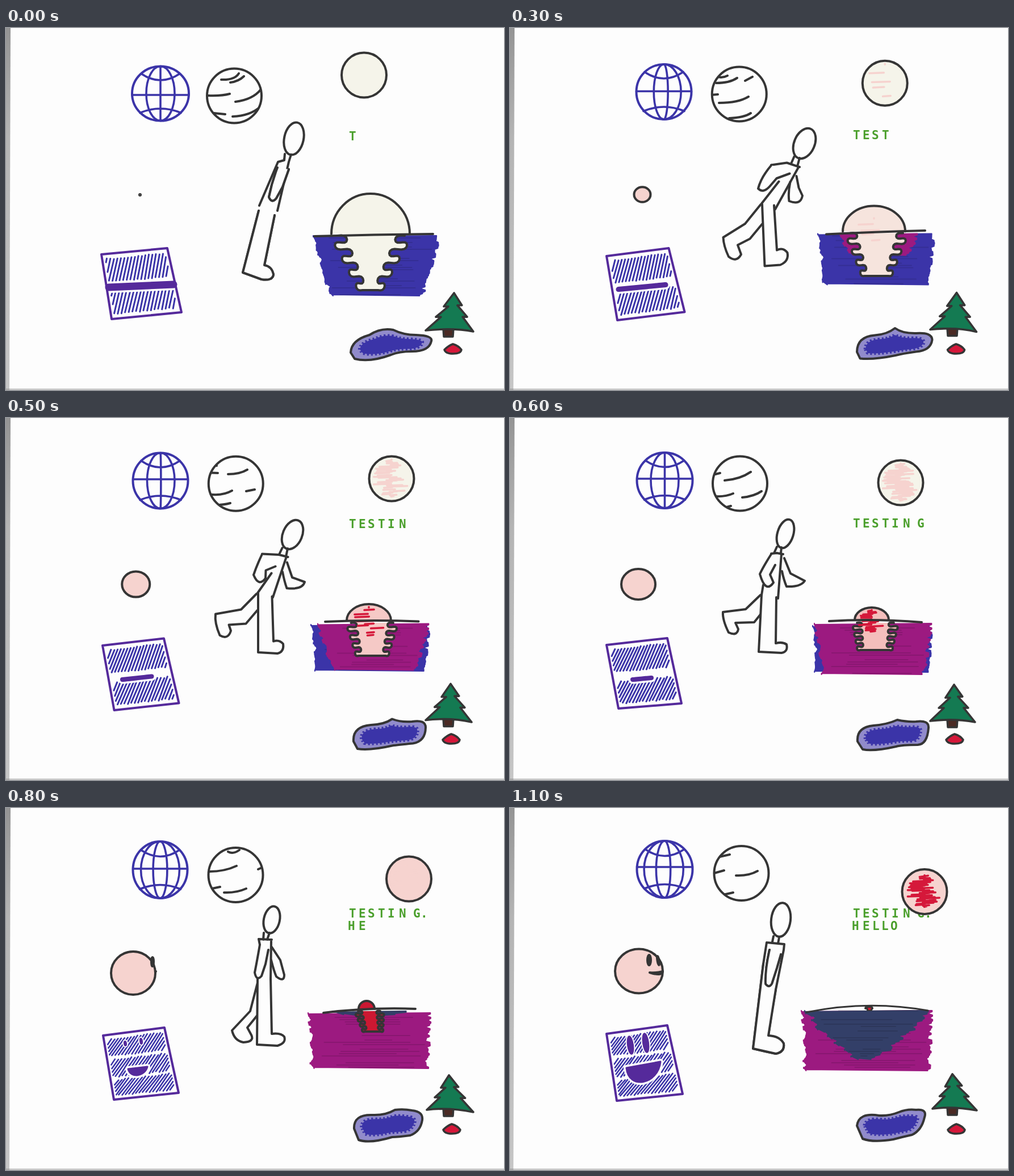
Recreate the animation shown at these times as an HTML page. Size 877 by 638 pixels, loop 1200 ms.

```html
<!DOCTYPE html>
<html lang="en">
<head>
<meta charset="utf-8">
<title>Marker doodles</title>
<style>
  html, body { margin: 0; width: 100%; height: 100%; overflow: hidden; background: #fdfdfd; }
  svg { display: block; width: 877px; height: 638px; fill: none; stroke-linecap: round; stroke-linejoin: round; }
  .cel { visibility: hidden; animation: show 1.2s step-end infinite; }
  @keyframes show { 0% { visibility: visible; } 8.3333% { visibility: hidden; } }
  text { font: bold 21px "DejaVu Sans Mono", monospace; fill: #4a9f2b; }
</style>
</head>
<body>
<svg id="stage" viewBox="0 0 877 638">
  <defs>
    <linearGradient id="edge" x2="0" y2="1">
      <stop stop-color="#949494"/><stop offset=".3" stop-color="#b4b4b4"/><stop offset="1" stop-color="#c6c6c6"/>
    </linearGradient>
  </defs>
  <path fill="#fdfdfd" d="M0 0H877V638H0Z"/>
  <path fill="url(#edge)" d="M0 0H8L6 638H0Z"/>
  <path stroke="#8a8a8a" d="M0 636.5H877"/>
</svg>
<script>
const PAPER = '#fdfdfd', INK = '#353535', BLUE = '#3b34a8', PURPLE = '#552a9b', PINK = '#f6d3cf', RED = '#d5183a';
const CREAM = [245, 244, 234], ROSE = [246, 211, 207], SCARLET = [204, 24, 50];
let frame = 0;

// Halfway between two numbers, lists or path strings of the same form
function mix(a, b) {
  if (typeof a === 'number') return (a + b) / 2;
  if (Array.isArray(a)) return a.map((v, i) => mix(v, b[i]));
  const other = b.match(/[\d.]+/g);
  return a.replace(/[\d.]+/g, n => (+n + +other.shift()) / 2);
}

// Poses are drawn on every second frame and on the last one
function at(keys) {
  const k = Math.floor(frame / 2);
  if (frame === 11) return keys[6];
  return frame % 2 ? mix(keys[k], keys[k + 1]) : keys[k];
}

function seeded(seed) {
  return () => (seed = (seed * 16807) % 2147483647) / 2147483647;
}

const rgb = c => `rgb(${c.map(Math.round)})`;
const line = (d, color = INK, width = 4, fill = 'none') =>
  `<path d="${d}" stroke="${color}" stroke-width="${width}" fill="${fill}"/>`;
const oval = ([x, y, rx, ry, turn = 0], color = INK, fill = 'none', width = 4) =>
  `<ellipse cx="${x}" cy="${y}" rx="${Math.max(1, rx - width / 2)}" ry="${Math.max(1, ry - width / 2)}" transform="rotate(${turn} ${x} ${y})" stroke="${color}" stroke-width="${width}" fill="${fill}"/>`;

function streaks(x, y, rx, ry, count, color) {
  const rnd = seeded(77);
  let d = '';
  for (let i = 0; i < Math.round(count); i++) {
    const v = ((i * 0.618) % 1) * 2 - 1;
    const half = rx * Math.sqrt(1 - v * v);
    const mid = x + (rnd() - 0.5) * half;
    const len = half * (0.2 + rnd() * 0.25);
    d += `M${mid - len} ${y + v * ry}L${mid + len} ${y + v * ry - 1}`;
  }
  return line(d, color, 3.5);
}

function globe() {
  const [x, y, rx, ry] = at([[272, 115.5, 50, 48], [270.5, 114, 49, 48], [271.5, 111, 48, 49],
    [272.5, 110, 49, 49], [271.5, 109, 48, 50], [273, 108, 48, 49], [272.5, 108, 49, 50]]);
  const eq = y + at([2.5, 0, -2, -3, -2, -3, -4]);
  const spin = at([0, 15, 2, 0, 15, 13, 12]);
  let d = `M${x - rx} ${eq}H${x + rx}`;
  for (let a = spin - 60; a <= 50; a += 30) {
    if (a < -50) continue;
    const bulge = rx * Math.sin(a * Math.PI / 180);
    d += `M${x} ${y - ry}A${Math.abs(bulge)} ${ry} 0 0 ${bulge > 0 ? 1 : 0} ${x} ${y + ry}`;
  }
  d += `M${x - 34} ${y - 35}Q${x} ${y - 12} ${x + 34} ${y - 35}M${x - 36} ${y + 34}Q${x} ${y + 19} ${x + 36} ${y + 34}`;
  return oval([x, y, rx + 2, ry + 2], BLUE) + line(d, BLUE, 3.6);
}

const stripes = [
  'M355 119Q380 120 394 116M379 91Q403 92 410 80M395 96Q410 94 419 85M366 150L386 152M404 130Q435 126 449 108M399 156Q430 155 449 138',
  'M372 84Q385 90 396 84M376 97Q400 97 413 88M427 93L440 86M355 119L379 117M381 132Q415 132 433 121M366 151L374 155M399 159Q425 158 437 150',
  'M370 83L384 84M363 96L386 97M404 99Q425 99 438 91M355 115L361 118M359 132Q390 140 411 128M372 153Q395 154 408 150M436 129L451 126',
  'M358 100L370 97M378 110Q405 108 424 95M360 138Q380 139 393 133M409 140Q430 138 443 129M378 158L389 155',
  'M391 77Q400 82 411 74M358 112Q385 112 406 102M444 108L453 104M358 143L377 139M384 149Q405 150 423 142',
  'M376 83L396 82M360 114Q380 112 388 107M414 116Q430 116 444 107M375 155L406 143',
  'M369 86L387 82M359 115L377 110M398 119Q420 120 436 111M375 153L393 149'
];

function planet() {
  const [x, y] = at([[402, 119.5], [403, 117], [404.5, 116], [405, 115.5], [404.5, 118], [406, 115], [407.5, 115]]);
  const held = frame === 11 ? 6 : Math.floor(frame / 2);
  const slide = frame % 2 && frame < 11 ? -13 : 0;
  return `<clipPath id="ball${frame}"><circle cx="${x}" cy="${y}" r="49"/></clipPath>` +
    `<g clip-path="url(#ball${frame})"><g transform="translate(${slide})">${line(stripes[held])}</g></g>` +
    oval([x, y, 50, 50]);
}

function moon() {
  const [x, y] = at([[630.5, 83], [650.5, 94.5], [670, 100], [688, 114], [709.5, 125], [724, 139.5], [730, 147.5]]);
  const fill = rgb(at([CREAM, CREAM, CREAM, CREAM, ROSE, ROSE, ROSE]));
  return oval([x, y, 41.5, 41.5], INK, fill) +
    streaks(x, y, 36, 33, at([0, 0, 9, 55, 55, 0, 0]), PINK) +
    streaks(x, y, 34, 28, at([0, 0, 0, 0, 0, 14, 38]), RED);
}

function words() {
  const y = at([198, 197, 194, 193, 193, 192, 193]);
  const row = (s, n, xs, base) => n > 0 ? `<text x="${xs}" y="${base}">${s.slice(0, n)}</text>` : '';
  return row('TESTING.', frame + 1, [604, 621, 637, 655, 672, 692, 717, 730], y) +
    row('HELLO', frame - 6, [602, 621, 638, 654, 670], y + 22);
}

function face() {
  const ball = at([[236, 294, 3, 3], [234.5, 294, 12, 10.5], [231.5, 293, 21, 20], [226, 293, 32, 29],
    [224, 291, 41, 40], [227, 288.5, 43, 40], [227, 287.5, 44, 41]]);
  let s = oval(ball, INK, frame ? PINK : INK);
  if (frame > 7) {
    s += oval(at([, , , , [258, 271, 4, 10], [251, 269, 5, 11], [245, 268, 5, 11]]), INK, INK, 2);
    s += line(at([, , , , 'M264 288Q264 288 264 288Q264 288 264 288Z', 'M251 290Q260 290 268 290Q260 290 251 290Z',
      'M246 290Q258 291 269 288Q267 297 246 290Z']), INK, 4, INK);
  }
  if (frame === 11) s += oval([261, 269, 3.5, 10, -10], INK, INK, 2);
  return s;
}

function panel() {
  const [ax, ay, bx, by, cx, cy, dx, dy] = at([
    [168, 399, 284, 388, 309, 501, 186, 513], [170, 402, 280, 387, 308, 499, 188, 512],
    [170, 402, 279, 389, 307, 502, 190, 518], [170, 400, 277, 388, 302, 503, 191, 512],
    [171, 401, 279, 387, 304, 502, 190, 514], [171, 399, 277, 386, 306, 502, 188, 514],
    [170, 398, 277, 383, 304, 504, 188, 516]]);
  const spot = (u, v) => `${(1 - v) * (ax + (bx - ax) * u) + v * (dx + (cx - dx) * u)} ${(1 - v) * (ay + (by - ay) * u) + v * (dy + (cy - dy) * u)}`;
  const lean = at([0.13, 0.14, 0.18, 0.25, 0.25, 0.27, 0.27]);
  const rows = frame < 8 ? [[0.07, 0.44], [0.58, 0.93]] : [[0.06, 0.34], [0.38, 0.66], [0.69, 0.95]];
  const rnd = seeded(41);
  let hatch = '';
  for (const [v0, v1] of rows) {
    for (let u = 0.07; u < 0.94 + lean; u += 0.053) {
      const from = Math.max(0, (u - 0.95) / lean), to = Math.min(1, (u - 0.05) / lean);
      const wob = rnd() * 0.04;
      if (to - from < 0.15) continue;
      const p = t => spot(u - lean * t, v0 + wob / 2 + (v1 - v0 - wob) * t);
      hatch += `M${p(from)}L${p(to)}`;
    }
  }
  const [lx, ly, rx, ry, deep, w] = at([[181, 457, 295, 452, 0, 13], [188, 460, 284, 452, 0, 10], [194, 461, 264, 453, 0, 8],
    [216, 461, 249, 458, 0, 8], [215, 460, 249, 456, 17, 3], [208, 460, 258, 450, 33, 3], [205, 458, 265, 447, 40, 3]]);
  const mouth = `M${lx} ${ly}C${lx + 4} ${ly + deep} ${rx - 4} ${ry + deep} ${rx} ${ry}Z`;
  let s = line(hatch, BLUE, frame < 8 ? 3 : 2.6) + line(mouth, PAPER, w + 7) + line(mouth, PURPLE, w, PURPLE);
  if (frame > 7) {
    const eyes = at([, , , , [[210, 415, 3, 5, -8], [238, 411, 3, 6, -8]], [[210, 417, 6, 12, -8], [238, 412, 6, 13, -8]],
      [[212, 418, 6, 17, -8], [239, 414, 6, 18, -8]]]);
    for (const e of eyes) s += oval([e[0], e[1], e[2] + 2, e[3] + 2, e[4]], PAPER, PAPER, 2) + oval(e, PURPLE, PURPLE, 2);
  }
  return s + line(`M${ax} ${ay}L${bx} ${by}L${cx} ${cy}L${dx} ${dy}Z`, PURPLE, 4);
}

// Each pose: head, neck and torso, far arm, far leg, near leg, near arm
const hang0 = 'M478 246Q468 272 463 298Q468 310 476 300L487 280L498 249';
const hang10 = 'M448 248Q445 280 450 308Q456 316 460 300L464 275L463 240';
const hang11 = 'M457 250Q449 285 450 310Q456 318 461 310L470 282L477 258';
const poses = [
  [[507, 195, 19, 31, 12], 'M491 222L490 233M502 223L498 236M479 236L490 233L490 230M479 236L446 313M498 236L478 322',
    hang0, 'M445 322L431 376L417 431Q433 437 450 443Q470 446 471 434L455 418L464 374L473 330',
    'M445 322L417 431L450 443Q470 446 471 434Q468 420 455 418L473 330', hang0],
  [[513, 200, 18, 30, 18], 'M498 222L494 233M506 226L503 238M478 243L483 231L508 240M458 288L443 314M506 243L466 325',
    'M492 270Q481 290 481 307Q492 318 497 300L503 275L502 260',
    'M442 314L415 352L388 389Q392 402 402 418Q416 430 424 420L414 397L430 378L445 358',
    'M443 316L447 425L474 419Q493 410 488 395Q480 386 466 393L462 312',
    'M479 243Q447 268 442 288Q452 297 465 283L482 269L503 249'],
  [[524, 207, 22, 30, 28], 'M503 231L497 243M514 232L510 246M442 240L492 244L512 250M489 253L443 305M510 248L468 314',
    'M495 272Q498 290 502 303Q532 308 533 291L514 288L507 262',
    'M441 308L413 338L363 349Q360 366 368 388Q382 398 390 378L388 368L415 365L443 333',
    'M445 305L450 414L478 416Q490 412 489 397Q482 386 474 390L468 313',
    'M442 240Q437 258 432 278Q440 287 450 275L457 261L482 264'],
  [[485, 204, 16, 28, 17], 'M470 227L465 238M478 228L477 238M460 239L470 238L481 240M446 294L443 312M478 240L472 318',
    'M479 270Q482 285 487 297Q512 298 519 287L494 274L483 247',
    'M441 312L415 337L375 342Q374 356 385 378Q400 385 402 372L397 361L430 360L442 345',
    'M443 312L438 412L478 414Q490 412 487 399Q480 394 468 397L469 316',
    'M460 240Q446 262 440 275Q450 310 464 290L458 276L467 259'],
  [[468, 197, 16, 26, 12], 'M454 220L453 232M464 220L460 232M447 241L445 231L468 232M443 300L443 306M467 235L466 302',
    'M467 268Q472 288 476 297Q490 308 490 294L483 268L468 245',
    'M443 308L430 358L398 392Q402 410 418 413Q438 412 432 400L425 387L434 376L442 366',
    'M443 302L442 417L478 419Q494 414 490 403Q484 396 468 398L466 300',
    'M447 241Q442 270 438 290Q441 306 450 296L457 275L462 250'],
  [[457, 193, 16.5, 27, 0], 'M451 219L451 231M461 219L461 231M446 246L446 231L469 233M447 250L444 313M469 233L470 300',
    hang10, 'M444 313L444 360L444 420Q461 421 478 422Q492 416 491 405L473 393L472 350L470 300',
    'M444 313L444 420L478 422Q492 416 491 405Q488 394 473 393L470 300', hang10],
  [[477, 197, 19, 32, 7], 'M464 226L462 236M474 228L472 239M452 237L483 240L482 250M452 237L446 275M482 250L468 320',
    hang11, 'M446 275L437 350L428 424Q448 429 468 433Q484 430 482 415L455 401L461 360L468 320',
    'M446 275L428 424L468 433Q484 430 482 415Q475 402 455 401L468 320', hang11]
];

function runner() {
  const [head, body, farArm, farLeg, leg, arm] = at(poses);
  return line(farLeg) + line(farArm) + line(leg, INK, 4, PAPER) + line(body) + line(arm, INK, 4, PAPER) + oval(head);
}

// Marker-filled area with ragged sides
function scribble([x0, x1, y0, y1, taper], color, rough, seed) {
  const rnd = seeded(seed);
  const left = [], right = [];
  let grain = '';
  for (let y = y0; y <= y1; y += 4) {
    const inset = taper * ((y - y0) / (y1 - y0)) ** 1.4;
    const l = x0 + inset + rnd() * rough, r = x1 - inset - rnd() * rough;
    left.unshift(`${l} ${y}L${l} ${y + 2}`);
    right.push(`${r} ${y}L${r} ${y + 2}`);
    if (r - l > 30 && rnd() < 0.6) grain += `M${l + rnd() * (r - l) / 2} ${y}H${r - rnd() * (r - l) / 3}`;
  }
  return line(`M${right.join('L')}L${left.reverse().reverse().join('L')}Z`, color, 2, color) +
    `<g opacity=".12">${line(grain, '#000', 2)}</g>`;
}

function ripple([xl, xr, y0, bl, br, y1, amp], fill) {
  const side = (a, b, dir) => Array.from({ length: 61 }, (_, i) => {
    const v = i / 60, wave = v * Math.PI * 8;
    const swing = amp * Math.sin(wave) * (1 - v * 0.4);
    return `${a + (b - a) * v + dir * swing} ${y0 + (y1 - y0) * v - amp * 0.2 * Math.sin(2 * wave)}`;
  });
  return line(`M${side(xl, bl, 1).join('L')}L${side(xr, br, -1).reverse().join('L')}`, INK, amp > 4 ? 4 : 2, fill);
}

function sunset() {
  const fill = rgb(at([CREAM, CREAM, ROSE, [244, 190, 188], SCARLET, [120, 22, 40], SCARLET]));
  const [x, y, rx, ry] = at([[642, 363, 69, 71], [641, 359, 62, 54], [641, 358, 48, 36], [637, 356, 30, 22],
    [635, 354, 14, 14], [633, 355, 8, 12], [632, 353, 6, 3]]);
  let s = line(`M${x - rx} ${y}A${rx} ${ry} 0 0 1 ${x + rx} ${y}`, INK, 4, fill);
  if (frame < 8) s += scribble(at([[541, 764, 366, 470, 28], [543, 747, 363, 458, 6], [541, 750, 362, 447, 10],
    [533, 744, 366, 448, 2], [533, 748, 366, 455, 4]]), BLUE, 9, 5);
  if (frame > 2) s += scribble(at([, [600, 690, 362, 366, 0], [562, 748, 363, 438, 35], [536, 744, 362, 452, 12],
    [532, 749, 361, 457, 3], [511, 746, 356, 459, 3], [513, 745, 357, 464, 3]]), '#9c1a80', 9, 9);
  if (frame > 7) s += scribble(at([, , , , [575, 705, 358, 366, 50], [543, 738, 355, 406, 82], [519, 737, 357, 442, 88]]),
    '#333f68', 16, 23);
  s += ripple(at([[584, 702, 366, 628, 655, 462, 14], [595, 696, 362, 624, 664, 445, 11], [604, 688, 361, 626, 668, 429, 10],
    [611, 676, 361, 617, 668, 409, 9], [620, 659, 358, 632, 660, 394, 7], [627, 639, 357, 629, 637, 364, 2],
    [628, 638, 352, 630, 636, 357, 1]]), fill);
  s += streaks(x, y, rx * 0.65, ry * 0.5, at([0, 10, 0, 0, 0, 0, 0]), PINK);
  s += streaks(x, y + 3, rx * 0.85, ry * 0.9, at([0, 0, 0, 20, 0, 0, 0]), RED);
  const [hx, hy, mx, my, ex, ey] = at([[543, 367, 648, 364, 752, 363], [552, 367, 640, 360, 734, 357],
    [562, 360, 645, 358, 728, 357], [562, 358, 640, 353, 725, 360], [559, 361, 640, 351, 721, 354],
    [546, 357, 630, 345, 713, 351], [522, 360, 630, 338, 736, 357]]);
  return s + line(`M${hx} ${hy}Q${mx} ${my} ${ex} ${ey}`, INK, at([4, 4, 4, 4, 4, 4, 3]));
}

function pond() {
  const d = at([
    'M607 572Q608 550 640 541Q660 528 682 532Q700 541 722 541Q752 542 749 552Q745 570 715 570Q692 570 678 576Q640 590 614 583Z',
    'M610 572Q612 545 640 543Q660 540 678 529Q692 540 715 541Q746 542 746 554Q740 572 715 570Q690 572 678 578Q640 585 616 583Z',
    'M612 570Q610 543 645 540Q668 540 678 529Q690 537 715 535Q740 530 741 545Q742 565 715 571Q690 576 680 576Q640 585 617 582Z',
    'M612 570Q610 545 640 542Q665 540 682 532Q700 536 715 535Q738 532 737 546Q735 575 718 576Q690 576 680 579Q640 588 621 584Z',
    'M613 565Q612 540 645 541Q668 542 685 532Q700 530 715 533Q735 535 733 550Q730 570 712 577Q690 580 680 580Q640 592 621 585Z',
    'M612 562Q616 538 650 542Q668 544 685 534Q700 530 715 531Q734 530 731 545Q728 570 708 579Q690 580 675 582Q640 590 621 584Z',
    'M611 560Q614 536 650 542Q668 543 685 536Q700 530 715 532Q735 530 730 545Q725 568 708 576Q690 580 675 584Q640 590 621 583Z']);
  const mid = at([678, 678, 676, 674, 673, 672, 671]);
  return line(d, INK, 4, '#918bcb') +
    `<g transform="translate(${mid} 559) scale(.77 .6) translate(${-mid} -559)" stroke-dasharray="4 5" stroke-linecap="butt">${line(d, BLUE, 9, BLUE)}</g>`;
}

function tree() {
  const [ax, ay, lx, ly, rx, ry] = at([[789, 467, 739, 533, 823, 535], [789, 466, 742, 532, 822, 535],
    [784, 467, 738, 531, 821, 536], [782, 470, 740, 534, 819, 536], [780, 471, 741, 532, 823, 536],
    [781, 470, 744, 527, 822, 533], [779, 469, 744, 530, 822, 533]]);
  const on = (x, y, t, dx = 0) => `${ax + (x - ax) * t + dx} ${ay + (y - ay) * t}`;
  const l = (t, dx) => on(lx, ly, t, dx), r = (t, dx) => on(rx, ry, t, dx);
  const d = `M${ax} ${ay}L${l(0.36)}L${l(0.36, 8)}L${l(0.64)}L${l(0.64, 9)}L${lx} ${ly}` +
    `Q${ax} ${ly - 5} ${rx} ${ry}L${r(0.62, -6)}L${r(0.62, 2)}L${r(0.32, -5)}L${r(0.32, 3)}Z`;
  return line(`M770 ${ly - 3}L788 ${ly - 3}L787 ${ly + 11}L771 ${ly + 11}Z`, INK, 3.5, '#4b2a24') + line(d, INK, 3.6, '#147a52');
}

function rock() {
  const x = at([787, 786, 785, 783, 785, 787, 786]);
  return `<g transform="translate(${x} 566)">${line('M-15 1Q-8 -6 0 -9Q10 -6 15 1Q14 8 0 8Q-13 8 -15 1Z', INK, 3.5, RED)}</g>`;
}

const parts = [globe, planet, words, moon, face, panel, runner, sunset, pond, tree, rock];
let cels = '';
for (frame = 0; frame < 12; frame++) {
  cels += `<g class="cel" style="animation-delay:${frame * 100 - 1200}ms">${parts.map(draw => draw()).join('')}</g>`;
}
document.getElementById('stage').insertAdjacentHTML('beforeend', cels);
</script>
</body>
</html>
```
